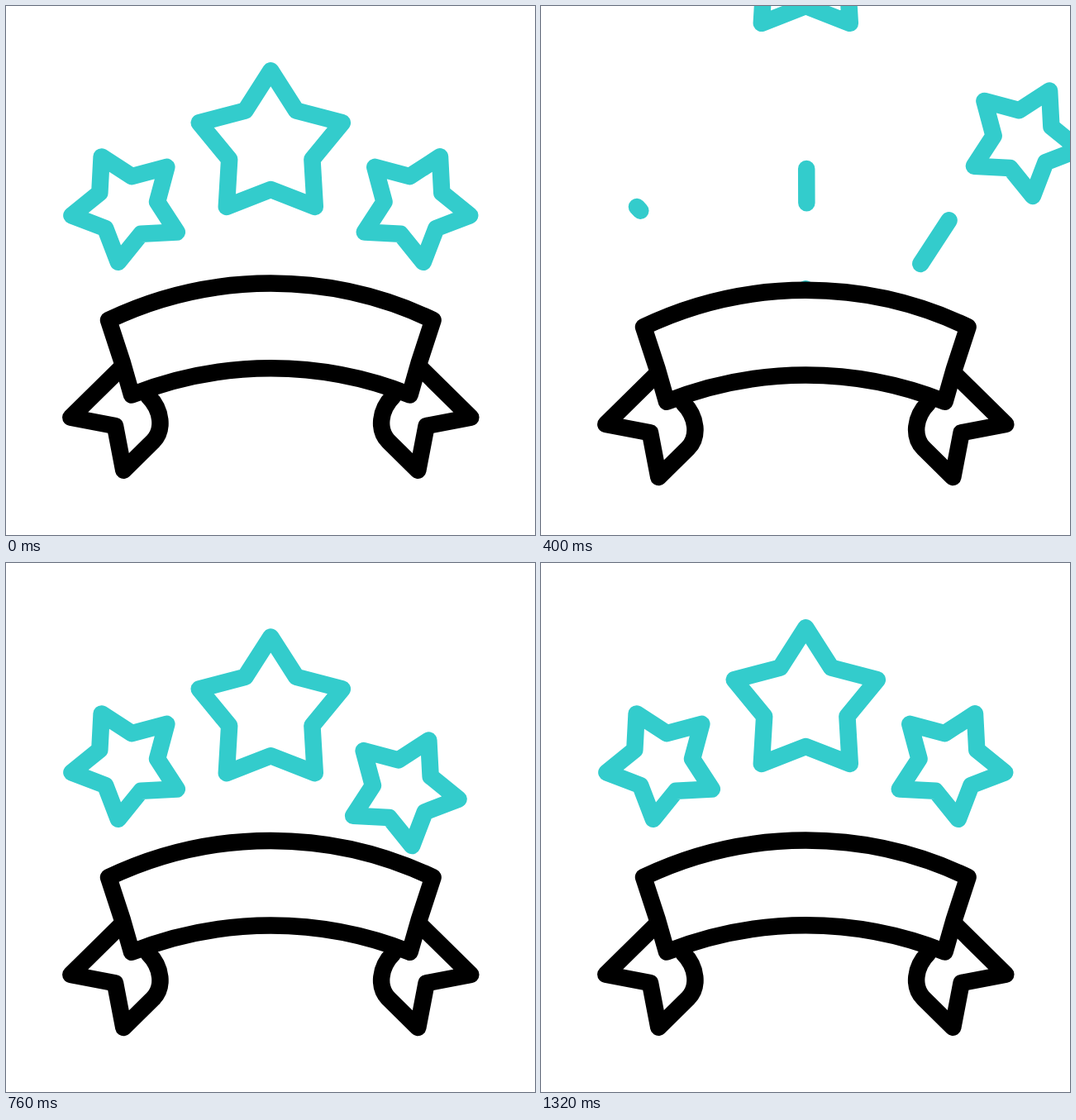
Recreate the animation shown at these times as an HTML page. Size 640 by 640 pixels, loop 1.48 s.

```html
<!DOCTYPE html>
<html lang="en">
<head>
<meta charset="utf-8">
<title>Three stars and a ribbon</title>
<style>
  html, body { margin: 0; width: 100%; height: 100%; overflow: hidden; background: #fff; }
  svg { display: block; width: 100vw; height: 100vh; }
  .ink { fill: none; stroke-width: 20.5; stroke-linecap: round; stroke-linejoin: round; }
</style>
</head>
<body>
<svg viewBox="0 0 640 640">
  <defs>
    <clipPath id="above">
      <path id="edge" d="M-20-60H660V380H516.6A456 456 0 0 0 124 380H-20Z"/>
    </clipPath>
    <path id="tail" d="M141 436L78.3 497.7L132 508L142.3 561.7L178 526.5C191 513 189 489 172 472"/>
  </defs>
  <g class="ink" stroke="#33cccc">
    <g id="streaks"></g>
    <g id="leaving"></g>
    <g clip-path="url(#above)"><g id="rising"></g></g>
  </g>
  <g id="ribbon" class="ink" stroke="#000">
    <use href="#tail"/>
    <use href="#tail" transform="matrix(-1 0 0 1 640.6 0)"/>
    <path fill="#fff" d="M124 380A456 456 0 0 1 516.6 380L499.6 432L488.6 470.5A456 456 0 0 0 152 470.5L141 432Z"/>
  </g>
</svg>
<script>
const LOOP = 1480, STEP = 40;
const $ = id => document.getElementById(id);

// out: exit start and travel; back: entry end, duration and starting offset
const stars = [
  { x: 146.4, y: 242.8, R: 67.8, r: 37.1, turn: -27,
    out: { at: 115, by: [-221.5, -190] }, back: { end: 757, dur: 357, from: [75, 190] },
    streak: { head: 104, tail: 157, a: [195, 328.5], b: [116, 243] } },
  { x: 320.3, y: 169.3, R: 91, r: 52.7, turn: 0,
    out: { at: 200, by: [0, -277] }, back: { end: 810, dur: 410, from: [0, 264] },
    streak: { head: 183, tail: 236, a: [321.6, 305], b: [321.2, 197] } },
  { x: 494.2, y: 242.8, R: 67.8, r: 37.1, turn: 27,
    out: { at: 280, by: [229, -203] }, back: { end: 916, dur: 516, from: [-82, 194] },
    streak: { head: 304, tail: 359, a: [456, 317], b: [514, 228] } }
];

const clamp = p => Math.min(1, Math.max(0, p));
const smooth = (t, at, dur) => {
  const p = clamp((t - at) / dur);
  return p * p * (3 - 2 * p);
};
const wave = (t, at, end) => (1 - Math.cos(Math.PI * clamp((t - at) / (end - at)))) / 2;

function add(parent, d) {
  const el = document.createElementNS('http://www.w3.org/2000/svg', 'path');
  if (d) el.setAttribute('d', d);
  return parent.appendChild(el);
}

function starPath({ x, y, R, r, turn }) {
  let d = '';
  for (let i = 0; i < 10; i++) {
    const a = (turn - 90 + i * 36) * Math.PI / 180, len = i % 2 ? r : R;
    d += (i ? 'L' : 'M') + (x + len * Math.cos(a)).toFixed(2) + ' ' + (y + len * Math.sin(a)).toFixed(2);
  }
  return d + 'Z';
}

const move = (el, [x, y], k = 1) => el.setAttribute('transform', `translate(${x * k} ${y * k})`);

for (const s of stars) {
  const d = starPath(s);
  s.leaver = add($('leaving'), d);
  s.riser = add($('rising'), d);
  s.line = add($('streaks'));
}

// Ribbon dips, lifts, then settles
const ribbonY = t => 13 * wave(t, 165, 565) - 25.4 * wave(t, 565, 955) + 12.4 * wave(t, 955, 1320);

function drawStreak(line, { head, tail, a, b }, t) {
  const h = smooth(t, head, 160), k = smooth(t, tail, 283);
  const at = p => a.map((v, i) => v + (b[i] - v) * p);
  line.setAttribute('d', h > k ? `M${at(k)}L${at(h)}` : '');
}

function draw(t) {
  const dip = [0, ribbonY(t)];
  move($('ribbon'), dip);
  move($('edge'), dip);
  for (const s of stars) {
    const { out, back } = s;
    move(s.leaver, out.by, smooth(t, out.at, 280));
    move(s.riser, back.from, clamp((back.end - t) / back.dur) ** 1.5);
    drawStreak(s.line, s.streak, t);
  }
}

const start = performance.now();
function tick(now) {
  const t = Math.max(0, now - start) % LOOP;
  draw(Math.floor(t / STEP) * STEP);
  requestAnimationFrame(tick);
}
draw(0);
requestAnimationFrame(tick);
</script>
</body>
</html>
```
